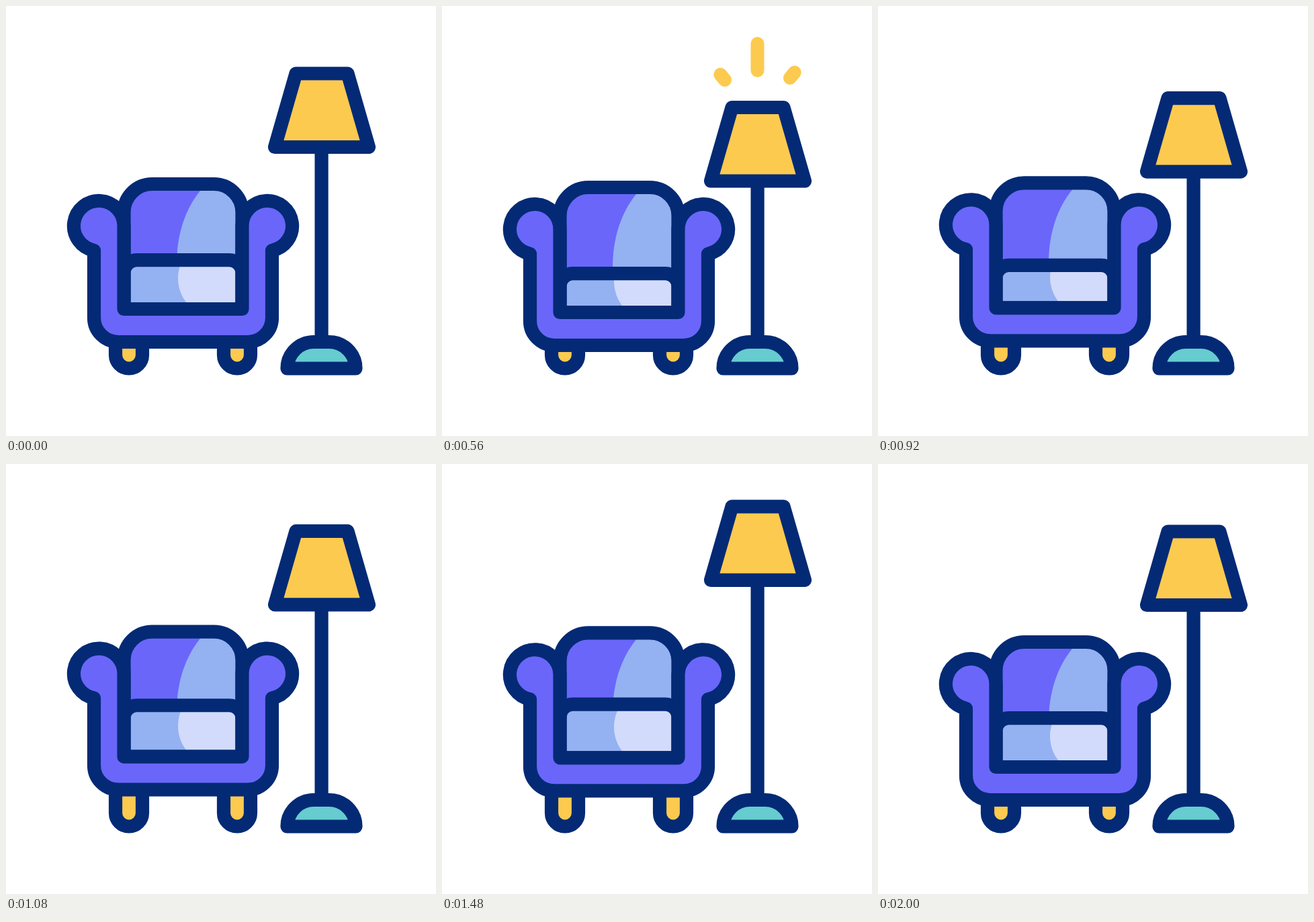
Animation, 640 px wide and 640 px high, one loop 2440 ms. Source, as an HTML page:

```html
<!DOCTYPE html>
<html lang="en">
<head>
<meta charset="utf-8">
<title>Armchair and lamp</title>
<style>
  html, body { margin: 0; width: 100%; height: 100%; overflow: hidden; background: #fff; }
  svg { display: block; width: 100%; height: 100%; }
  .line { stroke: #042a75; stroke-width: 20.2; stroke-linejoin: round; }
  .ray { stroke: #fdca50; stroke-width: 20; stroke-linecap: round; }
</style>
</head>
<body>
<svg viewBox="0 0 640 640" fill="none">
  <g class="line" fill="#fdca50">
    <path d="M163 482V519.5a20 20 0 0 0 40 0V482Z"/>
    <path d="M324 482V519.5a20 20 0 0 0 40 0V482Z"/>
  </g>
  <g id="chair">
    <path fill="#6a66fa" d="M175.5 451V307a42 42 0 0 1 42-42H309.5a42 42 0 0 1 42 42V451Z"/>
    <path fill="#94b1f2" d="M297 265H309.5a42 42 0 0 1 42 42V451H254V385C254 340 267 302 289 275Z"/>
    <path class="line" d="M175.5 451V307a42 42 0 0 1 42-42H309.5a42 42 0 0 1 42 42V451"/>
    <path id="cushion" fill="#94b1f2"/>
    <path id="cushionLight" fill="#d2dbfb"/>
    <path id="cushionLine" class="line"/>
    <path class="line" fill="#6a66fa" d="M175.5 327A37.3 37.3 0 1 0 131 363.8V464a36 36 0 0 0 36 36H360a36 36 0 0 0 36-36V363.8A37.3 37.3 0 1 0 351.5 327V451H175.5Z"/>
  </g>
  <path id="pole" class="line"/>
  <path class="line" fill="#66cccf" d="M418.5 539.5H520.5A39.5 39.5 0 0 0 481 500H458A39.5 39.5 0 0 0 418.5 539.5Z"/>
  <path id="shade" class="line" fill="#fdca50" d="M431.5 100.5H508.5L540 210H400Z"/>
  <g id="rays"></g>
</svg>
<script>
const LOOP = 2440, STEP = 40;
const $ = id => document.getElementById(id);
const clamp = x => Math.min(1, Math.max(0, x));
const progress = (t, from, to) => clamp((t - from) / (to - from));

// Cubic ease-in-out with handles at 0.42 and 0.58.
function ease(x) {
  let lo = 0, hi = 1;
  for (let i = 0; i < 24; i++) {
    const s = (lo + hi) / 2, r = 1 - s;
    if (1.26 * r * r * s + 1.74 * r * s * s + s ** 3 < x) lo = s; else hi = s;
  }
  return lo * lo * (3 - 2 * lo);
}

// Each move is [start, end, target value].
function track(t, moves) {
  let value = 0;
  for (const [from, to, target] of moves)
    if (t > from) value += (target - value) * ease(progress(t, from, to));
  return value;
}

const lampMoves = [[200, 520, 50.5], [755, 1360, -40], [1360, 2000, 0]];
const chairMoves = [[200, 500, 5], [760, 1200, -19], [1200, 1960, 0]];
const cushionMoves = [[200, 520, 15], [760, 1240, -9.3], [1240, 1920, 0]];

const rays = [
  { start: 520, inner: [421, 110], outer: [401, 86] },
  { start: 460, inner: [469.5, 96], outer: [469.5, 48] },
  { start: 520, inner: [518, 107], outer: [538, 82.5] }
];
for (const ray of rays) {
  ray.node = document.createElementNS("http://www.w3.org/2000/svg", "path");
  ray.node.setAttribute("class", "ray");
  $("rays").append(ray.node);
}

function drawRay({ start, inner, outer, node }, t) {
  const head = progress(t, start, start + 120);
  const tail = progress(t, start + 120, start + 280);
  const at = u => inner.map((v, i) => v + (outer[i] - v) * u).join(" ");
  node.setAttribute("d", head > tail ? `M${at(tail)}L${at(head)}` : "");
}

function drawCushion(top) {
  const edge = y => 316 - Math.sqrt(3600 - (y - 405) ** 2);
  const outline = `M175.5 451V${top + 19}a19 19 0 0 1 19-19H332.5a19 19 0 0 1 19 19V451Z`;
  $("cushion").setAttribute("d", outline);
  $("cushionLine").setAttribute("d", outline);
  $("cushionLight").setAttribute("d",
    `M${edge(top)} ${top}A60 60 0 0 0 ${edge(451)} 451H351.5V${top + 19}a19 19 0 0 0-19-19Z`);
}

function draw(t) {
  const lamp = track(t, lampMoves);
  $("shade").setAttribute("transform", `translate(0 ${lamp})`);
  $("pole").setAttribute("d", `M469.6 ${210 + lamp}V500`);
  $("chair").setAttribute("transform", `translate(0 ${track(t, chairMoves)})`);
  drawCushion(378.2 + track(t, cushionMoves));
  rays.forEach(ray => drawRay(ray, t));
}

const begin = performance.now();
function tick() {
  const t = (performance.now() - begin) % LOOP;
  draw(Math.floor(t / STEP) * STEP);
  requestAnimationFrame(tick);
}
tick();
</script>
</body>
</html>
```
